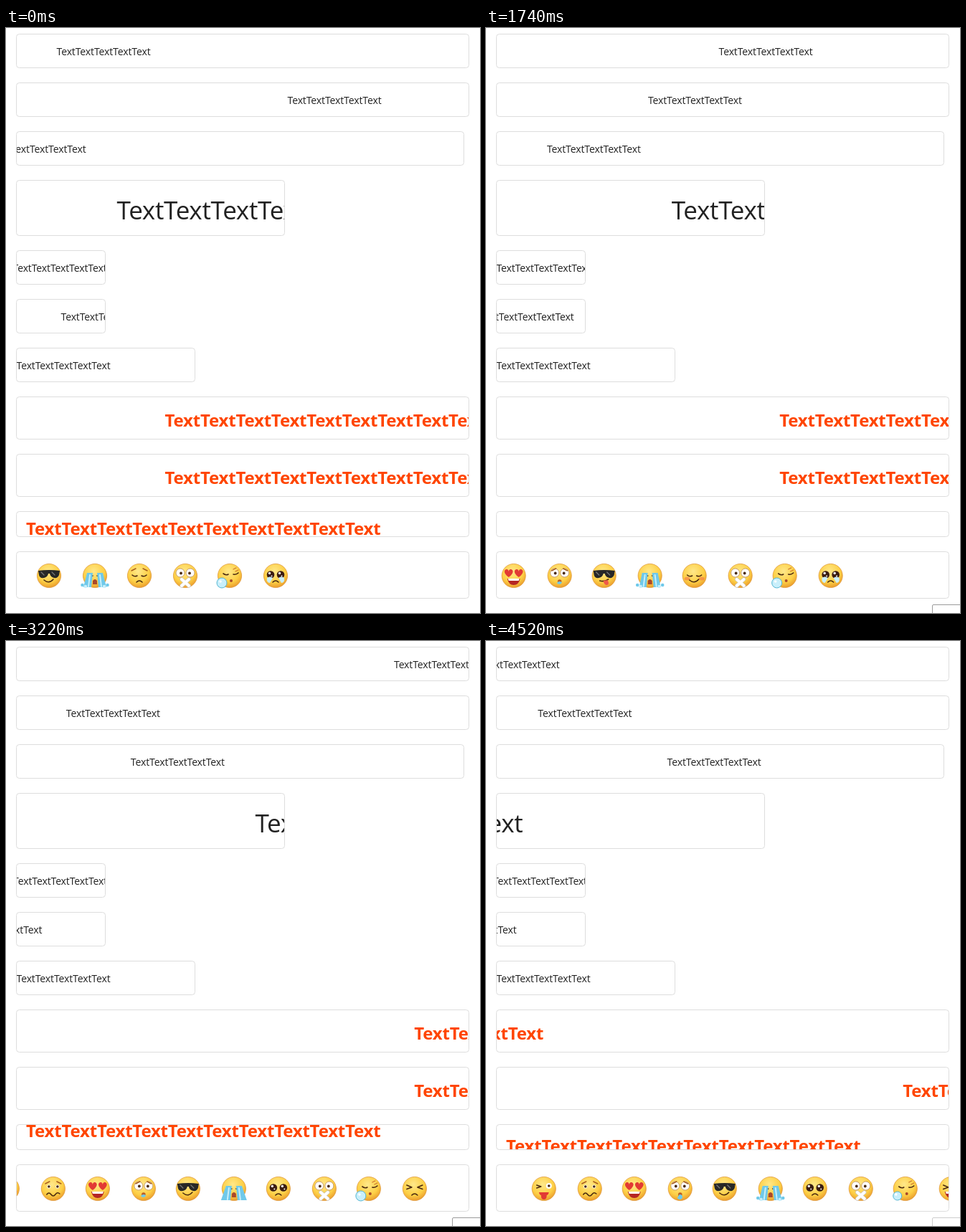
Write an HTML page that moves like this. It is 661 px wide and 816 px high and loops after 4590 ms.

```html
<!DOCTYPE html>
<html lang="en">
<head>
<meta charset="utf-8">
<title>Marquee rows</title>
<style>
html, body { margin: 0; width: 100%; height: 100%; overflow: hidden; background: #fff; }
svg { display: block; }
#stage { position: absolute; left: 0; top: 0; }
text { font-family: "Open Sans", "Noto Sans", sans-serif; fill: #212121; }
.bold { font-weight: 700; fill: #ff4500; }
.box { fill: none; stroke: #ddd; }
</style>
</head>
<body>
<svg id="stage" width="661" height="816" viewBox="0 0 661 816">
  <defs>
    <radialGradient id="skin" cx=".45" cy=".32" r=".7">
      <stop offset="0" stop-color="#ffe88a"/>
      <stop offset=".65" stop-color="#fdcf45"/>
      <stop offset="1" stop-color="#e9992c"/>
    </radialGradient>
  </defs>
  <g id="rows"></g>
  <path id="corner" d="M622.5 817V806q0-1.500 1.500-1.500H662V817Z" fill="#fff" stroke="#9a9a9a"/>
</svg>
<script>
const LOOP = 4590;
const NS = "http://www.w3.org/2000/svg";
const rowsEl = document.getElementById("rows");
const corner = document.getElementById("corner");

// Steps last 70 ms apart from these
const oddSteps = { 4: 60, 44: 80, 50: 60, 51: 60, 61: 60 };
const starts = [];
for (let i = 0, t = 0; t < LOOP; i++) {
  starts.push(t);
  t += oddSteps[i] || 70;
}

// Distance run by the first row over time; all rows share this pace
const pace = [[0, 0], [620, 92], [1180, 178], [1740, 254], [2860, 417], [3560, 521], [4520, 662]];
function travel(t) {
  let i = 1;
  while (i < pace.length - 1 && t > pace[i][0]) i++;
  const [t0, d0] = pace[i - 1], [t1, d1] = pace[i];
  return d0 + (d1 - d0) * (t - t0) / (t1 - t0);
}

const mod = (a, n) => ((a % n) + n) % n;
const wrap = (x, lo, hi) => lo + mod(x - lo, hi - lo);
function bounce(x, lo, hi) {
  const span = hi - lo, m = mod(x - lo, 2 * span);
  return lo + (m > span ? 2 * span - m : m);
}

function add(parent, tag, attrs) {
  const el = document.createElementNS(NS, tag);
  for (const k in attrs) el.setAttribute(k, attrs[k]);
  parent.append(el);
  return el;
}

function addBox(y, w, h) {
  const view = add(rowsEl, "svg", {
    x: 15, y: y + 1, width: w - 2, height: h - 2, viewBox: `15 ${y + 1} ${w - 2} ${h - 2}`
  });
  add(rowsEl, "rect", { class: "box", x: 14.5, y: y + .5, width: w - 1, height: h - 1, rx: 4 });
  return view;
}

const small = { size: 14, pitch: 26.2, reps: 5, base: 30, cls: "" };
const large = { size: 35, pitch: 65.5, reps: 5, base: 54.5, cls: "" };
const bold = { size: 24, pitch: 49.45, reps: 10, base: 41.5, cls: "bold" };

const rows = [
  { y: 8, w: 632, h: 48, type: small, x: d => wrap(71 + d, -116, 645) },
  { y: 76, w: 632, h: 48, type: small, x: d => bounce(393 - .656 * d, 15.8, 514) },
  { y: 144, w: 625, h: 48, type: small, x: d => wrap(-19 + .411 * d, -116, 638) },
  { y: 212, w: 375, h: 78, type: large, x: d => wrap(155 + .41 * d, -313.5, 388.5) },
  { y: 310, w: 125, h: 48, type: small, x: d => bounce(10 + .02 * d, 8.6, 15) },
  { y: 378, w: 125, h: 48, type: small, x: d => bounce(77 - .334 * d, -116, 138) },
  { y: 446, w: 250, h: 48, type: small, x: () => 15 },
  { y: 514, w: 632, h: 60, type: bold, x: d => wrap(222 + .739 * d, -480, 645) },
  { y: 594, w: 632, h: 60, type: bold, x: d => bounce(222 + .739 * d, -480, 646.5) },
  { y: 674, w: 632, h: 36, type: bold, x: () => 28.5, dy: d => wrap(679 + .11 * d, 643, 709) - 688 }
];

for (const row of rows) {
  const { size, pitch, reps, base, cls } = row.type;
  row.el = add(addBox(row.y, row.w, row.h), "text", { y: row.y + base, class: cls, "font-size": size });
  row.el.textContent = "Text".repeat(reps);
  const gap = pitch / 4 - row.el.getComputedTextLength() / (4 * reps);
  row.el.style.letterSpacing = gap.toFixed(3) + "px";
}

// Face parts, centred on 0,0
const INK = "#4a2a10", BLUE = "#6fc9ea", PALE = "#c9effb", RED = "#e23a34";
const dot = (x, y, r, fill, more = "") => `<circle cx="${x}" cy="${y}" r="${r}" fill="${fill}" ${more}/>`;
const line = (d, color = INK, w = 1.6) =>
  `<path d="${d}" fill="none" stroke="${color}" stroke-width="${w}" stroke-linecap="round" stroke-linejoin="round"/>`;
const fill = (d, color) => `<path d="${d}" fill="${color}"/>`;
const pair = part => part(-1) + part(1);
const head = dot(0, 0, 16.6, "url(#skin)", 'stroke="#dc9030" stroke-width=".7"');
const blush = pair(s => `<ellipse cx="${s * 10}" cy="4" rx="4" ry="2.500" fill="#f47b45" opacity=".65"/>`);

const wideEyes = pair(s => dot(s * 7, -4, 6, "#fff", 'stroke="#b98a58" stroke-width=".8"') + dot(s * 6, -3.500, 1.900, INK));
const bigEyes = pair(s => dot(s * 7, -1.500, 5.300, "#3b1d12") + dot(s * 7 - 1.500, -3.500, 1.700, "#fff") + dot(s * 7 + 1.500, .5, 1, "#fff"));
const shutEyes = pair(s => line(`M${s * 10} -1q${-s * 3} 3 ${-s * 7} 1`));
const squint = pair(s => line(`M${s * 11} -5l${-s * 7} 3l${s * 7} 2.500`));
const brows = pair(s => line(`M${s * 11} -7l${-s * 6} -3`, "#a65d1e", 1.400));
const frown = line("M-4 9q4-4 8 0");
const smile = line("M-7 6q7 6 13 -1");
const hearts = pair(s => `<path transform="translate(${s * 7} -4)" d="M0 6C-9 0-6-6-2-5Q0-4 0-2Q0-4 2-5C6-6 9 0 0 6Z" fill="${RED}"/>`);
const grin = fill("M-9 4H9Q7 13 0 13Q-7 13-9 4Z", "#b52624") + fill("M-8 4H8L7 7H-7Z", "#fff");
const shades = fill("M-15-7Q0-9 15-7L14-1Q12 4 7 3Q2 2 1-3H-1Q-2 2-7 3Q-13 4-14-1Z", "#272727") + line("M-11-5l4 4M4-5l4 4", "#777", 1.200);
const tongue = line("M-6 7q6 2 12-2") + fill("M-1 7L5 6Q8 12 4 13Q0 13-1 7Z", "#ee5948");
const drops = pair(s => dot(s * 17.500, 13, 2.300, BLUE) + dot(s * 13, 15, 2.200, PALE));
const streams = w => pair(s => fill(`M${s * 3} -4H${s * 11}L${s * w} 16H${s * 5}Z`, BLUE) + line(`M${s * 7} -1L${s * 9} 15`, PALE, 2));
const sob = w => shutEyes + streams(w) + fill("M-3 7Q0 3 3 7V12H-3Z", "#a9482b");
const bored = brows + pair(s => fill(`M${s * 3} -3H${s * 11}Q${s * 7} 4 ${s * 3} -3`, "#fff") + line(`M${s * 3} -3H${s * 11}`) + dot(s * 6, -1.500, 1.600, INK)) + line("M-4 8H4");
const cross = line("M-5 5L5 14M5 5L-5 14", "#c9c4bc", 5.400) + line("M-5 5L5 14M5 5L-5 14", "#fff", 4);
const cheekTears = pair(s => fill(`M${s * 9} 2Q${s * 17} 5 ${s * 16} 13Q${s * 10} 16 ${s * 7} 10Z`, BLUE) + dot(s * 12, 10, 1.700, PALE));
const welling = pair(s => fill(`M${s * 4} 3Q${s * 8} 0 ${s * 12} 3Q${s * 13} 10 ${s * 8} 10Z`, PALE));
const drip = long => fill(`M-1 8Q4 8 3 ${8 + long}Q0 ${12 + long}-4 ${8 + long}Z`, BLUE);
const bubble = r => dot(-11, 10, r, PALE, 'stroke="#54b6d2" stroke-width="1"') + dot(-13, 8, 1.800, "#fff");
const doze = line("M-9-3q4 3 7 1M5-2q4 1 7-2") + line("M5-9l4-2M8-6l4-2", "#ce7830", 1.200) + dot(2, 7, 2, "#a9482b");
const gasp = wideEyes + brows + dot(0, 8, 2.800, "#b95f27");

// Each face: distance from the sunglasses, then looks with their start times
const faces = [
  [-252, [0, pair(s => dot(s * 6, -3, 2, INK)) + blush + smile],
    [4040, line("M-10-5l6 2l-6 2") + dot(7, -4, 4, "#fff") + dot(7, -4, 1.800, INK) + fill("M-7 5H7Q6 9 4 9Q4 15 0 15Q-4 15-4 9Q-6 9-7 5Z", RED)]],
  [-188, [0, brows + pair(s => dot(s * 6, -3, 2.500, "#fff") + dot(s * 6, -3, 1.800, INK)) + line("M-9 8q3-4 6 0t6 0t6-1")]],
  [-126, [0, hearts + grin]],
  [-62, [0, gasp + dot(-4, 12, 2.500, BLUE)], [900, gasp + drip(2)], [4040, gasp + drip(5)]],
  [0, [0, shades + smile], [310, shades + tongue], [900, shades + smile], [1460, shades + tongue], [3220, shades + smile]],
  [64, [0, sob(16) + drops], [310, bored], [900, sob(18)], [1460, sob(15) + drops], [2300, sob(18)], [4040, sob(16) + drops]],
  [126, [0, brows + shutEyes + frown], [310, bigEyes + frown], [900, blush + shutEyes + smile], [2300, bigEyes + frown]],
  [190, [0, wideEyes + cross]],
  [252, [0, doze + bubble(7)], [4040, doze + bubble(6)]],
  [316, [0, bigEyes + welling + frown], [310, brows + bigEyes + cheekTears + frown], [900, squint + cheekTears + frown],
    [1460, bigEyes + welling + frown], [2300, squint + cheekTears + frown], [3220, squint + frown], [4040, squint + grin]]
];

const faceView = addBox(730, 632, 66);
for (const face of faces) {
  face.el = add(faceView, "g", {});
  face.el.innerHTML = head;
  face.looks = face.slice(1).map(([at, art]) => {
    const el = add(face.el, "g", {});
    el.innerHTML = art;
    return { at, el };
  });
}

function draw(t) {
  const d = travel(t);
  for (const { el, x, dy } of rows) {
    el.setAttribute("transform", `translate(${(x(d) - .5).toFixed(2)} ${(dy ? dy(d) : 0).toFixed(2)})`);
  }
  for (const { 0: offset, el, looks } of faces) {
    el.setAttribute("transform", `translate(${(60 + offset + .412 * d).toFixed(2)} 764)`);
    const now = looks.filter(look => look.at <= t).pop();
    for (const look of looks) look.el.style.display = look === now ? "" : "none";
  }
  corner.style.opacity = t < 620 ? 0 : t < 690 || t >= 4520 ? .5 : 1;
}

function tick() {
  const t = performance.now() % LOOP;
  draw(starts.filter(s => s <= t).pop());
  requestAnimationFrame(tick);
}
tick();
</script>
</body>
</html>
```
